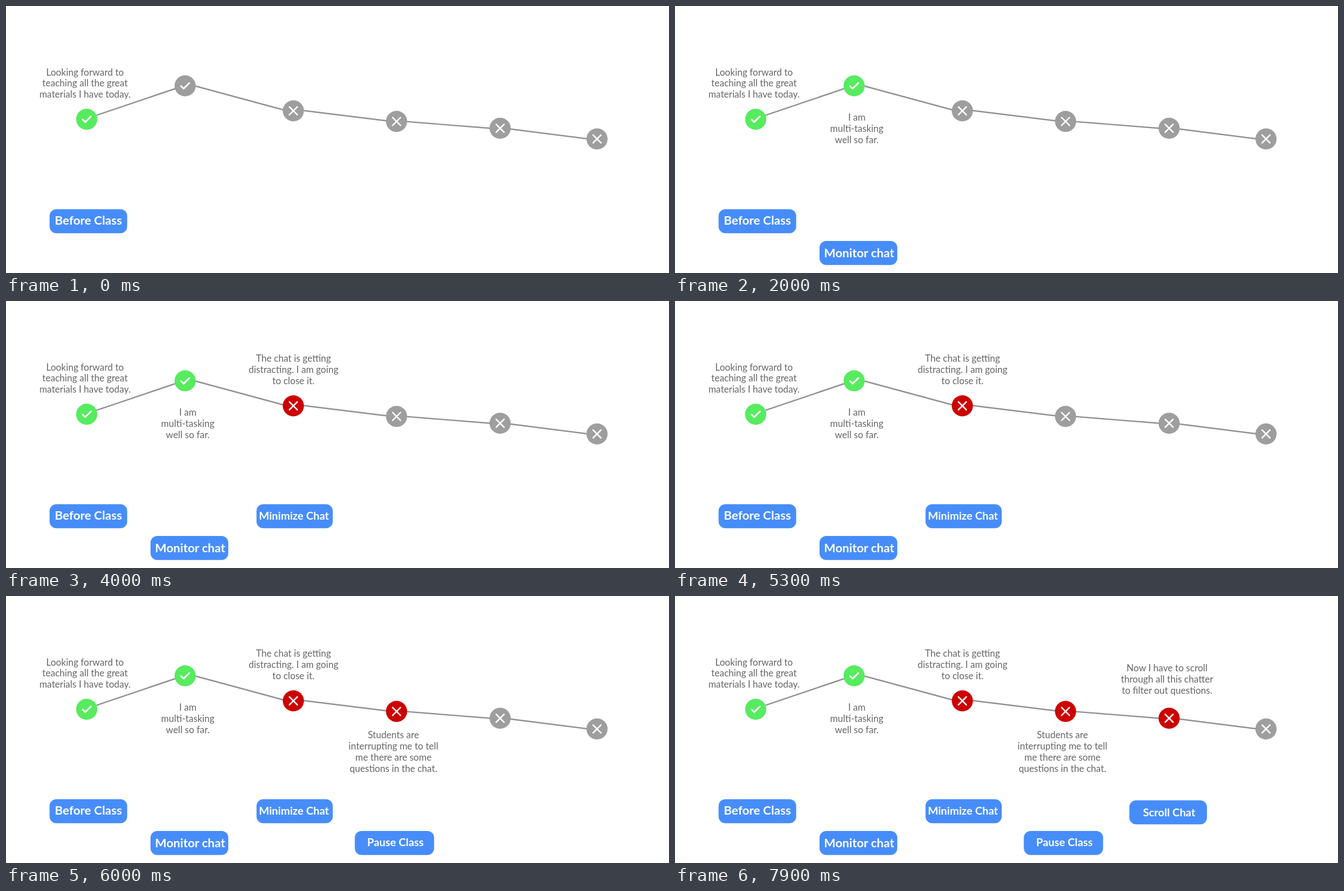
Animation of 1179 by 475 pixels, one loop 8000 ms. Source, as an HTML page:

```html
<!DOCTYPE html>
<html lang="en">
<head>
<meta charset="utf-8">
<title>Class journey</title>
<style>
  html, body { margin: 0; width: 100%; height: 100%; overflow: hidden; background: #fff; }
  svg { display: block; width: 100%; height: 100%; }
  text { font-family: Lato, sans-serif; text-anchor: middle; }
  .note { font-size: 16.6px; fill: #666; }
  .label { font-weight: 700; fill: #fff; }
  .button { fill: #478dfa; }
  .link { stroke: #919191; stroke-width: 2.4; }
  .mark { fill: none; stroke: #fff; stroke-linecap: round; stroke-linejoin: round; }
</style>
</head>
<body>
<svg id="stage" viewBox="0 0 1179 475"></svg>
<script>
const LOOP = 8000, LINE_HEIGHT = 19.9;
const GREY = '#9e9e9e', GREEN = '#57eb60', RED = '#cc0000';
const stage = document.getElementById('stage');

const links = [
  [161, 194.3, 301, 147], [337, 142.5, 494, 185], [529, 186, 677, 204.3],
  [712, 205.6, 861, 217.5], [896, 218.7, 1034, 236.2]
];

// at: reveal time; note: [center x, first baseline, lines]
// button: [x, y, width, height]; label: [center x, baseline, size, text]
const steps = [
  { x: 143.5, y: 201.5, good: true, at: 0,
    note: [140.5, 123.5, ['Looking forward to', 'teaching all the great', 'materials I have today.']],
    button: [77.5, 361.5, 138, 42.7], label: [146.5, 388.5, 21.6, 'Before Class'] },
  { x: 318.5, y: 142, good: true, at: 2000,
    note: [323.3, 204, ['I am', 'multi-tasking', 'well so far.']],
    button: [257, 418, 138.3, 42.7], label: [327.5, 447, 21.6, 'Monitor chat'] },
  { x: 511, y: 186.5, at: 3700,
    note: [511.3, 107.7, ['The chat is getting', 'distracting. I am going', 'to close it.']],
    button: [445.5, 361.5, 135.5, 42.7], label: [512, 388.5, 19.4, 'Minimize Chat'] },
  { x: 694.5, y: 205.3, at: 5400,
    note: [689, 253, ['Students are', 'interrupting me to tell', 'me there are some', 'questions in the chat.']],
    button: [620.3, 418, 141, 42.7], label: [692.5, 444.5, 19.4, 'Pause Class'] },
  { x: 878.7, y: 217.5, at: 7150,
    note: [875, 133.7, ['Now I have to scroll', 'through all this chatter', 'to filter out questions.']],
    button: [808, 363.5, 138, 42.7], label: [878.7, 392.2, 19.4, 'Scroll Chat'] },
  { x: 1051, y: 236.5 }
];

function add(parent, tag, attrs, text) {
  const el = document.createElementNS('http://www.w3.org/2000/svg', tag);
  for (const key in attrs) el.setAttribute(key, attrs[key]);
  if (text) el.textContent = text;
  return parent.appendChild(el);
}

function switchAt(el, prop, before, after, at) {
  const offset = at / LOOP;
  el.animate([
    { [prop]: before, offset: 0 }, { [prop]: before, offset },
    { [prop]: after, offset }, { [prop]: after, offset: 1 }
  ], { duration: LOOP, iterations: Infinity });
}

function drawNode({ x, y, good, at }) {
  const color = good ? GREEN : RED;
  const dot = add(stage, 'circle', { cx: x, cy: y, r: 18.8, fill: at === 0 ? color : GREY });
  if (at) switchAt(dot, 'fill', GREY, color, at);
  add(stage, 'path', {
    class: 'mark', transform: `translate(${x} ${y})`,
    'stroke-width': good ? 3 : 2.5,
    d: good ? 'M-7.3 .5L-2.6 5L7.5-5' : 'M-7-7L7 7M7-7L-7 7'
  });
}

function drawCard({ note, button, label, at }) {
  const card = add(stage, 'g', {});
  const [noteX, noteY, lines] = note;
  lines.forEach((line, i) =>
    add(card, 'text', { class: 'note', x: noteX, y: noteY + i * LINE_HEIGHT }, line));
  const [x, y, width, height] = button;
  add(card, 'rect', { class: 'button', x, y, width, height, rx: 12 });
  const [labelX, labelY, size, text] = label;
  add(card, 'text', { class: 'label', x: labelX, y: labelY, 'font-size': size }, text);
  if (at) switchAt(card, 'opacity', 0, 1, at);
}

links.forEach(([x1, y1, x2, y2]) => add(stage, 'line', { class: 'link', x1, y1, x2, y2 }));
steps.forEach(drawNode);
steps.filter(step => step.note).forEach(drawCard);
</script>
</body>
</html>
```
